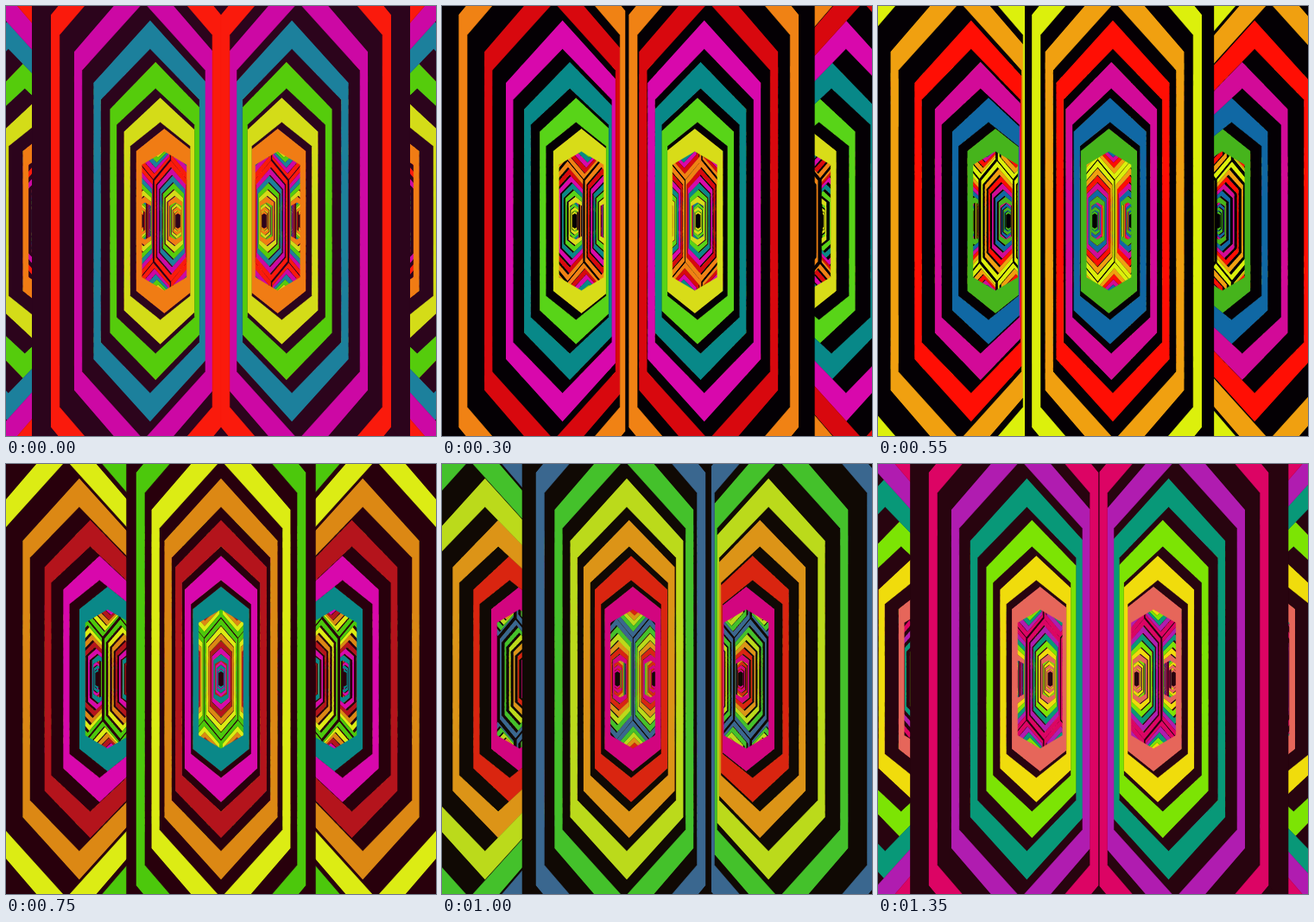
Animation of 498x498 px, one loop 1.4 s. Source, as an HTML page with a canvas:

```html
<!DOCTYPE html>
<html lang="en">
<head>
<meta charset="utf-8">
<title>Hexagon tunnels</title>
<style>
  html, body { margin: 0; width: 100%; height: 100%; overflow: hidden; background: #000; }
  canvas { display: block; width: 498px; height: 498px; }
</style>
</head>
<body>
<canvas id="stage" width="498" height="498"></canvas>
<script>
const ctx = document.getElementById('stage').getContext('2d');
const CENTER = 249, LOOP = 1400, TICK = 50;
const PITCH_X = 197, PITCH_Y = 597;
const STEP_DEPTH = 0.1, LAYERS = 6;
const WALL_DEPTHS = [1, 5.1, 9.2, 13.3];

// tick, travel in thirtieths of a cell, rim colours from near to far, then the wall colour
const KEYS = [
  [0, 0, 'fa1a0c cc08a4 1c809c 55cc0c d4dc18 f07c14 2c041c'],
  [6, 5, 'f08214 d8080e d808ac 088888 58d418 d8dc18 040004'],
  [10, 9.8, 'd8dc18 f08214 d8080e d808ac 088888 58d418 040004'],
  [11, 10.8, 'dcf00c f0a010 ff0e04 d20a98 1068a4 46b41c 040004'],
  [15, 15, '4cc80c dcec14 dc8814 b4141c d808ac 0a8888 28000c'],
  [18, 19, '109848 7ce414 f0dc14 d45a14 f0040c b41cc4 2c1a06'],
  [19, 20.2, '088888 58d40c dcdc20 dc7c14 d8080e d004a4 140c04'],
  [23, 25, 'd004a4 088888 58d40c dcdc20 dc7c14 d8080e 040004'],
  [27, 29, 'dc0464 b01cb0 089878 7ce404 f0dc0c e6665a 28040f']
].map(([tick, travel, colours]) => ({
  tick, travel,
  colours: colours.split(' ').map(hex => [0, 2, 4].map(i => parseInt(hex.substr(i, 2), 16)))
}));
KEYS.push({ tick: 28, travel: 30, colours: KEYS[0].colours });

const mix = (a, b, u) => a + (b - a) * u;

function stateAt(tick) {
  const i = KEYS.findIndex((key, n) => tick < KEYS[n + 1].tick);
  const from = KEYS[i], to = KEYS[i + 1];
  const u = (tick - from.tick) / (to.tick - from.tick);
  return {
    shift: mix(from.travel, to.travel, u) / 30,
    colours: from.colours.map((c, n) =>
      `rgb(${c.map((v, j) => Math.round(mix(v, to.colours[n][j], u)))})`)
  };
}

// Upright hexagon; each size step is one terrace further in
function addHexagon(cell, size, depth) {
  const w = 98.5 - 9.9 * size, side = 239 - 23.5 * size, tip = 358 - 39.5 * size;
  const at = (x, y) => [CENTER + (cell.x + x) / depth, CENTER + (cell.y + y) / depth];
  ctx.moveTo(...at(0, -tip));
  ctx.lineTo(...at(w, -side));
  ctx.lineTo(...at(w, side));
  ctx.lineTo(...at(0, tip));
  ctx.lineTo(...at(-w, side));
  ctx.lineTo(...at(-w, -side));
  ctx.closePath();
}

function fillRing(cell, sizeA, depthA, sizeB, depthB) {
  ctx.beginPath();
  addHexagon(cell, sizeA, depthA);
  addHexagon(cell, sizeB, depthB);
  ctx.fill('evenodd');
}

// The thin outline closes seams between neighbouring shapes
function drawRims(cells, colour, size, depth) {
  ctx.fillStyle = ctx.strokeStyle = colour;
  ctx.lineWidth = 0.6 / depth;
  for (const cell of cells) {
    fillRing(cell, size, depth, size + 1, depth);
    ctx.stroke();
  }
}

function drawWalls(cells, colour, size, near, far) {
  ctx.fillStyle = colour;
  for (const cell of cells) fillRing(cell, size, near, size, far);
}

function cellsAt(depth, shift) {
  const cells = [];
  const reachY = depth > 1 ? 85 : CENTER;
  const cols = Math.ceil(CENTER * depth / PITCH_X) + 1;
  const rows = Math.ceil(reachY * depth / PITCH_Y);
  for (let row = -rows; row <= rows; row++) {
    const stagger = row % 2 ? 0 : 0.5;
    for (let col = -cols; col <= cols; col++) {
      cells.push({ x: (col + stagger - shift) * PITCH_X, y: row * PITCH_Y });
    }
  }
  return cells;
}

function drawHoneycomb(depth, { shift, colours }) {
  const cells = cellsAt(depth, shift);
  const z = k => depth + k * STEP_DEPTH;
  for (let k = LAYERS - 1; k >= 0; k--) {
    drawRims(cells, colours[k], k, z(k));
    drawWalls(cells, colours[LAYERS], k, z(k - 1), z(k));
  }
}

function draw(tick) {
  const state = stateAt(tick);
  ctx.fillStyle = state.colours[LAYERS];
  ctx.fillRect(0, 0, 498, 498);
  for (const depth of [...WALL_DEPTHS].reverse()) drawHoneycomb(depth, state);
}

let lastTick = -1;
const start = performance.now();
function loop() {
  const tick = Math.floor((performance.now() - start) % LOOP / TICK);
  if (tick !== lastTick) draw(lastTick = tick);
  requestAnimationFrame(loop);
}
loop();
</script>
</body>
</html>
```
